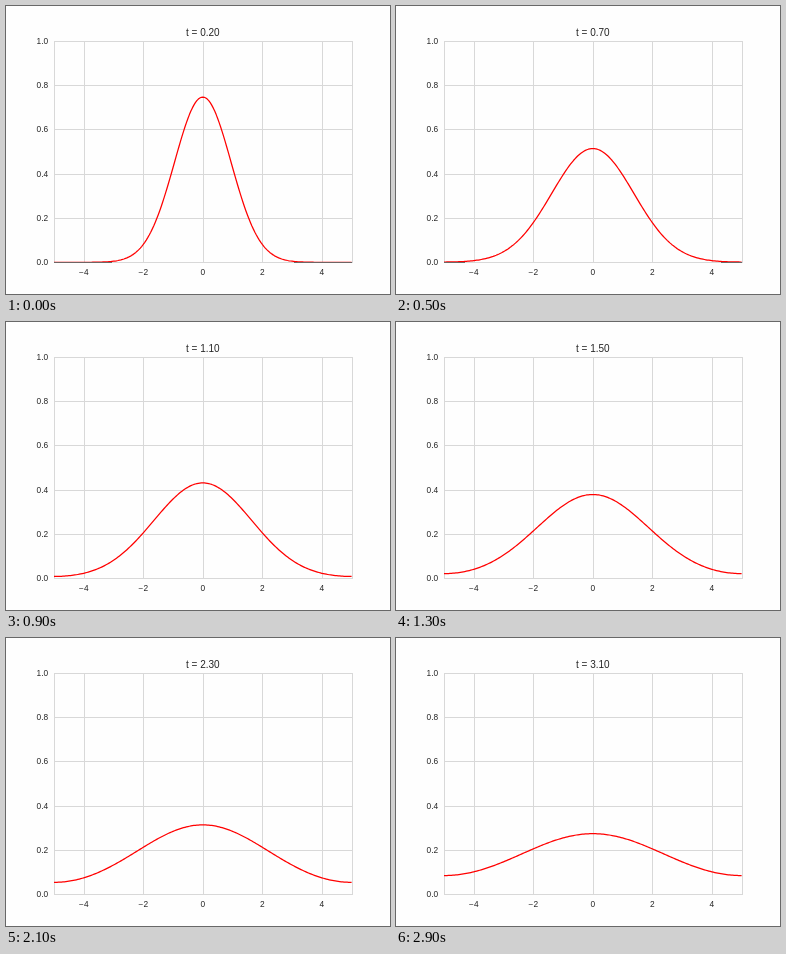
Recreate the animation shown at these times as an HTML page with a canvas. Size 384 by 288 pixels, loop 3000 ms.

```html
<!DOCTYPE html>
<html lang="en">
<head>
<meta charset="utf-8">
<title>Diffusion</title>
<style>
html, body { margin: 0; width: 100%; height: 100%; overflow: hidden; background: #fefefe; }
canvas { display: block; }
</style>
</head>
<body>
<canvas id="plot" width="384" height="288"></canvas>
<script>
const ctx = document.getElementById('plot').getContext('2d');
const LEFT = 48, RIGHT = 345.6, TOP = 34.56, BOTTOM = 256.32;
const FONT = '"Liberation Sans", Arial, sans-serif';
const STEP_MS = 100, STEPS = 30;

const toX = x => LEFT + (x + 5) / 10 * (RIGHT - LEFT);
const toY = y => BOTTOM - y * (BOTTOM - TOP);
const snap = v => Math.round(v) + 0.5;

// Spreading Gaussian on a periodic domain of width 10
function density(x, t) {
  const spread = 1 + 4 * t;
  let sum = 0;
  for (let k = -2; k <= 2; k++) sum += Math.exp(-((x - 10 * k) ** 2) / spread);
  return sum / Math.sqrt(spread);
}

function line(x1, y1, x2, y2, color) {
  ctx.strokeStyle = color;
  ctx.lineWidth = 1;
  ctx.beginPath();
  ctx.moveTo(x1, y1);
  ctx.lineTo(x2, y2);
  ctx.stroke();
}

function label(text, x, y, size, align) {
  ctx.font = `${size}px ${FONT}`;
  ctx.textAlign = align;
  ctx.fillStyle = '#262626';
  ctx.fillText(text, x, y);
}

function drawAxes() {
  for (let x = -4; x <= 4; x += 2) {
    const px = snap(toX(x));
    line(px, 35, px, 257, '#d8d8d8');
    label(String(x).replace('-', '\u2212'), toX(x), 269, 8.33, 'center');
  }
  for (let i = 0; i <= 5; i++) {
    const py = snap(toY(i / 5));
    line(48, py, 347, py, '#d8d8d8');
    label((i / 5).toFixed(1), 42.2, Math.round(toY(i / 5) + 3), 8.33, 'right');
  }
  for (const x of [LEFT, RIGHT]) line(snap(x), 35, snap(x), 257, '#d8d8d8');
}

function drawCurve(t) {
  ctx.save();
  ctx.beginPath();
  ctx.rect(48, 35, 298, 221);
  ctx.clip();
  ctx.beginPath();
  for (let i = 0; i <= 200; i++) {
    const x = -5 + i / 20;
    ctx.lineTo(toX(x), toY(density(x, t)));
  }
  ctx.strokeStyle = '#ff0000';
  ctx.lineWidth = 1.25;
  ctx.lineJoin = 'round';
  ctx.stroke();
  ctx.restore();
}

// The axis darkens where the curve lies on it
function drawContact(t) {
  for (let px = 48; px < 346; px++) {
    const x = (px + 0.5 - LEFT) / (RIGHT - LEFT) * 10 - 5;
    if (density(x, t) < 0.004) {
      ctx.fillStyle = '#6e6464';
      ctx.fillRect(px, 256, 1, 1);
    }
  }
}

function draw(now) {
  const step = Math.floor(now / STEP_MS) % STEPS;
  const t = 0.2 + step / 10;
  ctx.fillStyle = '#fefefe';
  ctx.fillRect(0, 0, 384, 288);
  drawAxes();
  drawCurve(t);
  drawContact(t);
  label('t = ' + t.toFixed(2), 196.8, 30, 10, 'center');
}

let start;
function frame(now) {
  start ??= now;
  draw(now - start);
  requestAnimationFrame(frame);
}
draw(0);
requestAnimationFrame(frame);
</script>
</body>
</html>
```
